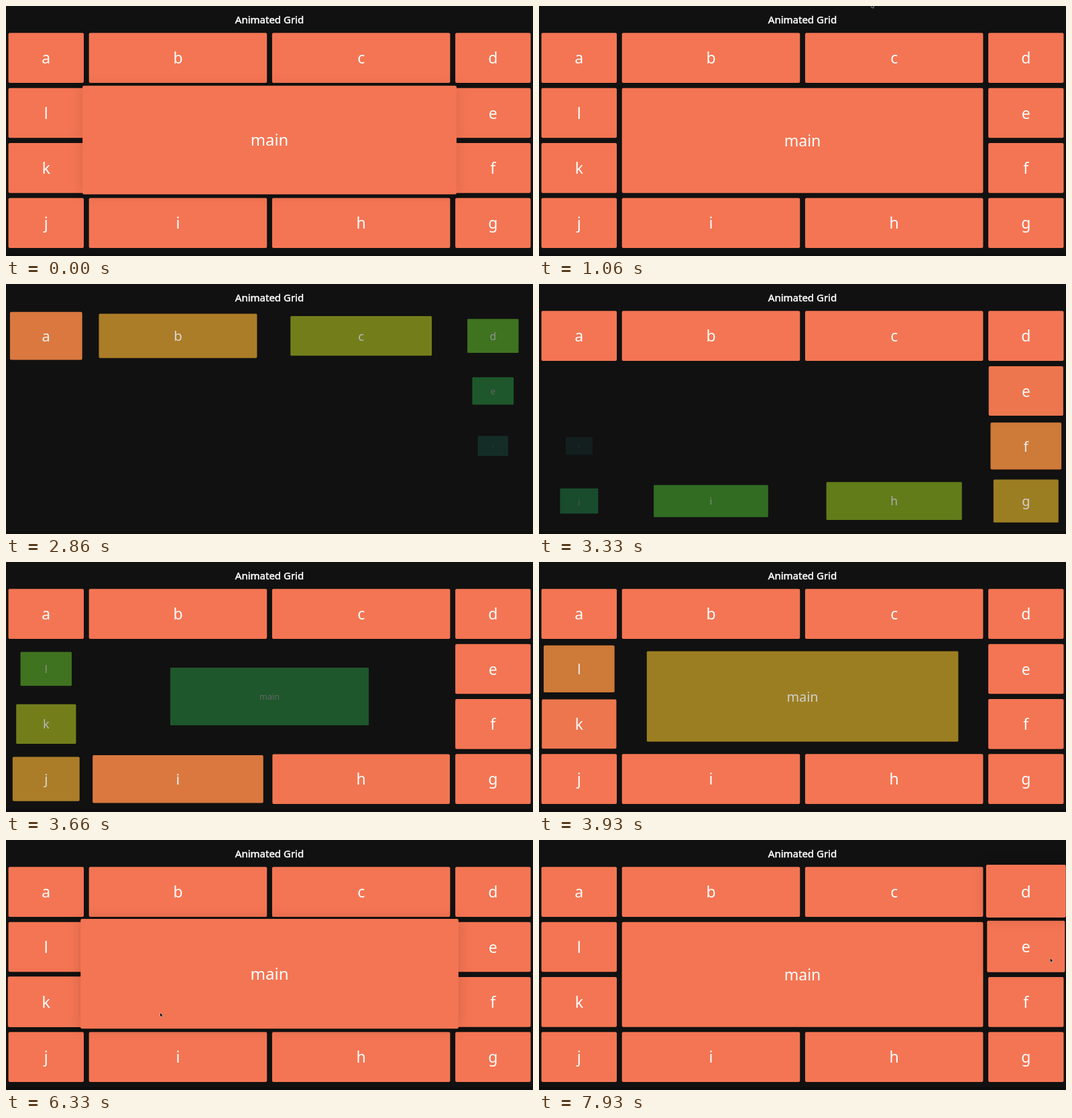
An HTML page with a canvas that plays this animation: 786 px wide and 374 px high, repeating every 8000 ms.

```html
<!DOCTYPE html>
<html lang="en">
<head>
<meta charset="utf-8">
<title>Animated Grid</title>
<style>
  html, body { margin: 0; width: 100%; height: 100%; overflow: hidden; background: #111; }
  canvas { display: block; }
</style>
</head>
<body>
<canvas id="stage" width="786" height="374"></canvas>
<script>
const ctx = document.getElementById('stage').getContext('2d');
const LOOP = 8000;
const BG = 17;
const CLEARED = 2060, ENTRANCE = 2297, STAGGER = 100, ENTER_TIME = 700;
const HOVER_TIME = 200, HOVER_GROW = 0.1, HOVER_LIFT = 2;
const LEFT = 3.6, TOP = 40.3, GAP = 7.7, ROW = 74.65, NARROW = 112.4, WIDE = 265.5;

const clamp = (v, lo = 0, hi = 1) => Math.min(hi, Math.max(lo, v));
const mix = (a, b, p) => a + (b - a) * p;

// Columns are narrow, wide, wide, narrow; four equal rows
const colStart = c => LEFT + c * GAP + (c && NARROW + (c - 1) * WIDE);
const colEnd = c => colStart(c) + (c % 3 ? WIDE : NARROW);
const rowStart = r => TOP + r * (ROW + GAP);

function makeCard(label, index, c, r, span = 1) {
  const x = colStart(c), y = rowStart(r);
  const w = colEnd(c + span - 1) - x;
  const h = rowStart(r + span - 1) + ROW - y;
  return { label, index, x, y, w, h, cx: x + w / 2, cy: y + h / 2 };
}

// Letters run clockwise round the rim, three to a side; the big card comes last
const cards = [...'abcdefghijkl'].map((label, i) => {
  const step = i % 3;
  const [c, r] = [[step, 0], [3, step], [3 - step, 3], [0, 3 - step]][Math.floor(i / 3)];
  return makeCard(label, i, c, r);
});
cards.push(makeCard('main', cards.length, 1, 1, 2));

// Pointer strokes through a few key points: [time, x, y]
const strokes = [
  [[-400, 500, 200], [-74, 500, 124]],
  [[60, 500, 112], [800, 496, -3], [2330, 496, -3]],
  [[4860, 373, 12], [5240, 90, 60], [5950, 60, 206], [6216, 116, 236], [6275, 123.6, 239],
   [6330, 229.5, 259], [7000, 565, 114], [7300, 650, 24], [7560, 730, 38],
   [7880, 755, 115], [7930, 762.5, 177], [LOOP, 763, 178]]
];

function pointerAt(t) {
  for (const stroke of strokes) {
    const i = stroke.findIndex(key => key[0] > t);
    if (i < 1) continue;
    const [t0, x0, y0] = stroke[i - 1], [t1, x1, y1] = stroke[i];
    const p = (t - t0) / (t1 - t0);
    return [mix(x0, x1, p), mix(y0, y1, p)];
  }
  return null;
}

function cardUnder(point) {
  if (!point) return undefined;
  const [px, py] = point;
  return cards.find(({ x, y, w, h }) => px >= x && px <= x + w && py >= y && py <= y + h);
}

// Walk the pointer path once and note when it is over each card
const visits = [];
for (let t = -400, open = null; t <= LOOP; t += 2) {
  const card = cardUnder(pointerAt(t));
  if (open && open.card === card) {
    open.end = t + 2;
  } else {
    open = card ? { card, start: t, end: t + 2 } : null;
    if (open) visits.push(open);
  }
}

function bezier(x1, y1, x2, y2) {
  const at = (a, b, s) => 3 * a * s * (1 - s) ** 2 + 3 * b * s * s * (1 - s) + s ** 3;
  return x => {
    if (x <= 0) return 0;
    if (x >= 1) return 1;
    let lo = 0, hi = 1;
    for (let i = 0; i < 24; i++) {
      const mid = (lo + hi) / 2;
      if (at(x1, x2, mid) < x) lo = mid; else hi = mid;
    }
    return at(y1, y2, lo);
  };
}
const ease = bezier(0.25, 0.1, 0.25, 1);
const easeOut = bezier(0, 0, 0.58, 1);

// Coral after a CSS-style hue rotation, with the colour shift of a
// BT.709 recording decoded as BT.601, faded into the background
function cardColor(degrees, alpha) {
  const R = 255, G = 127, B = 80;
  const a = degrees * Math.PI / 180, c = Math.cos(a), s = Math.sin(a);
  const luma = 0.213 * R + 0.715 * G + 0.072 * B;
  const r = clamp(luma + c * (R - luma) + s * (-0.213 * R - 0.715 * G + 0.928 * B), 0, 255);
  const g = clamp(luma + c * (G - luma) + s * (0.143 * R + 0.14 * G - 0.283 * B), 0, 255);
  const b = clamp(luma + c * (B - luma) + s * (-0.787 * R + 0.715 * G + 0.072 * B), 0, 255);
  const y = 0.2126 * r + 0.7152 * g + 0.0722 * b;
  const cb = (b - y) / 1.8556, cr = (r - y) / 1.5748;
  const rgb = [y + 1.402 * cr, y - 0.344 * cb - 0.714 * cr, y + 1.772 * cb];
  return `rgb(${rgb.map(v => Math.round(mix(BG, clamp(v, 0, 255), alpha)))})`;
}

function entered(card, t) {
  if (t < CLEARED) return 1;
  return easeOut((t - ENTRANCE - card.index * STAGGER) / ENTER_TIME);
}

function hovered(card, t) {
  const amounts = visits.filter(v => v.card === card).map(({ start, end }) =>
    ease((t - start) / HOVER_TIME) * (1 - ease((t - end) / HOVER_TIME)));
  return Math.max(0, ...amounts);
}

function drawCard({ card, shown, hover }) {
  if (shown <= 0) return;
  const scale = mix(0.3, 1, shown) * (1 + HOVER_GROW * hover);
  ctx.save();
  ctx.translate(card.cx, card.cy - HOVER_LIFT * hover);
  ctx.scale(scale, scale);
  if (hover > 0) {
    ctx.shadowColor = `rgba(0,0,0,${0.33 * hover})`;
    ctx.shadowBlur = 20;
  }
  ctx.fillStyle = cardColor(180 * (1 - shown), shown);
  ctx.beginPath();
  ctx.roundRect(-card.w / 2, -card.h / 2, card.w, card.h, 2);
  ctx.fill();
  ctx.shadowColor = 'transparent';
  const gray = Math.round(mix(BG, 255, shown));
  ctx.fillStyle = `rgb(${gray},${gray},${gray})`;
  ctx.font = '23px "Noto Sans", sans-serif';
  ctx.fillText(card.label, 0, 8.7);
  ctx.restore();
}

function drawPointer([x, y]) {
  ctx.save();
  ctx.translate(x, y);
  ctx.beginPath();
  [[0, 0], [0, 5.4], [1.3, 4.3], [2.2, 6.3], [3.1, 5.9], [2.3, 4], [3.9, 3.8]]
    .forEach(p => ctx.lineTo(...p));
  ctx.closePath();
  ctx.lineWidth = 1;
  ctx.strokeStyle = 'rgba(255,255,255,0.8)';
  ctx.stroke();
  ctx.fillStyle = '#111';
  ctx.fill();
  ctx.restore();
}

function drawTitle() {
  ctx.font = '15px "Noto Sans", sans-serif';
  ctx.fillStyle = ctx.strokeStyle = '#fff';
  ctx.lineWidth = 0.5;
  ctx.fillText('Animated Grid', 393, 25.5);
  ctx.strokeText('Animated Grid', 393, 25.5);
}

function draw(t) {
  ctx.fillStyle = '#111';
  ctx.fillRect(0, 0, 786, 374);
  ctx.fillStyle = '#0d0d0d';
  ctx.fillRect(0, 370, 786, 4);

  ctx.textAlign = 'center';
  drawTitle();

  cards
    .map(card => ({ card, shown: entered(card, t), hover: hovered(card, t) }))
    .sort((a, b) => a.hover - b.hover)
    .forEach(drawCard);

  const pointer = pointerAt(t);
  if (pointer) drawPointer(pointer);
}

const began = performance.now();
function tick() {
  draw((performance.now() - began) % LOOP);
  requestAnimationFrame(tick);
}
tick();
</script>
</body>
</html>
```
